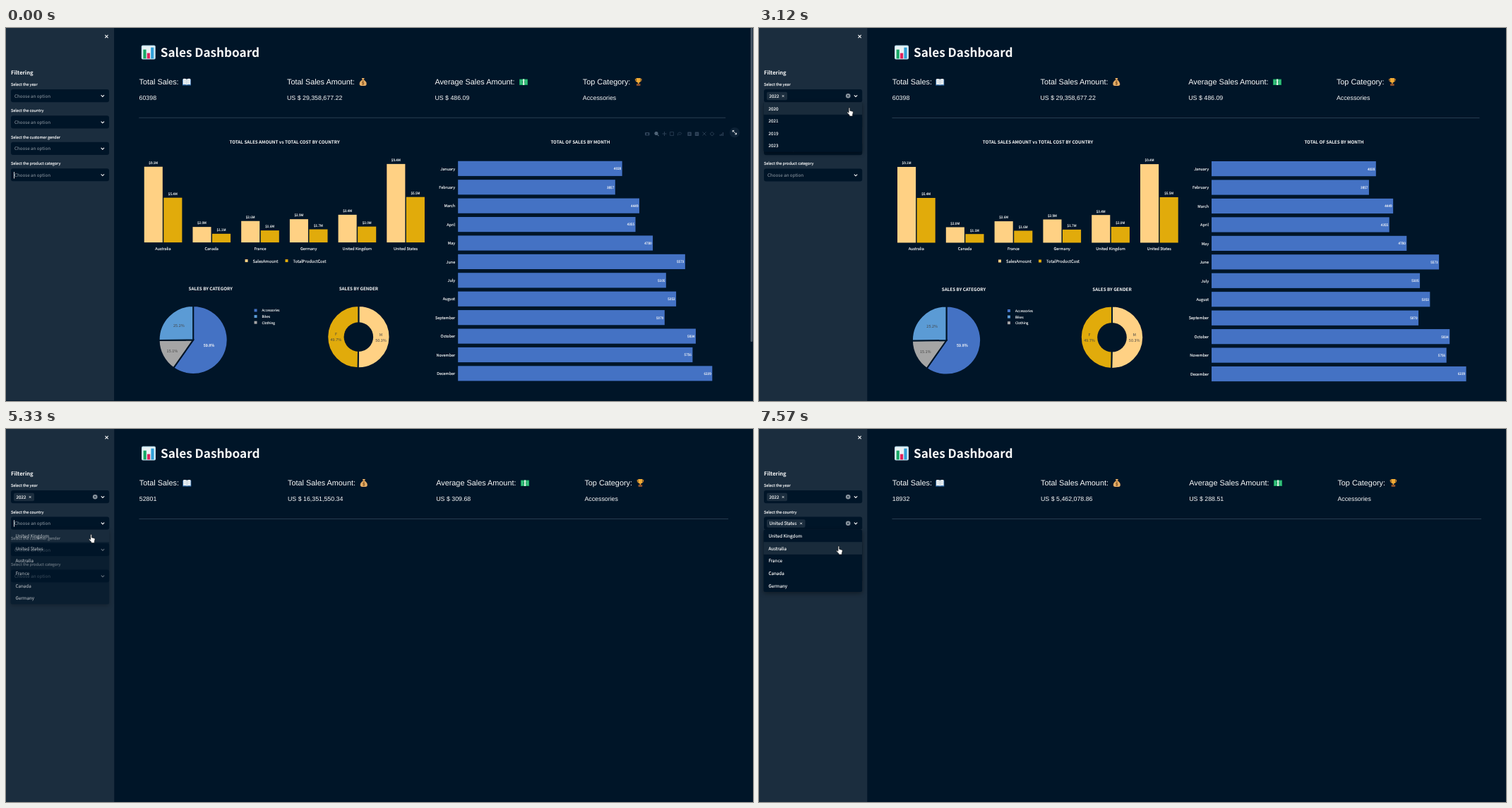
Recreate the animation shown at these times as an HTML page. Size 1058x529 px, loop 8 s.

```html
<!DOCTYPE html>
<html lang="en">
<head>
<meta charset="utf-8">
<title>Sales Dashboard</title>
<style>
  html, body { margin: 0; width: 100%; height: 100%; overflow: hidden; background: #001528; }
  svg { display: block; width: 1058px; height: 529px; }
  text { font-family: "Noto Sans CJK JP", "Noto Sans CJK SC", "Noto Sans CJK KR", "Noto Sans", sans-serif; text-rendering: geometricPrecision; white-space: pre; }
  .plain { font-family: "Liberation Sans", Arial, sans-serif; }
</style>
</head>
<body>
<svg id="stage" viewBox="0 0 1058 529"></svg>
<script>
const LOOP = 8000;
const BG = '#001528', SIDE = '#1b2d3e', HOVER = '#192b3b', WHITE = '#fafafa', MUTED = '#98a2ac';
const BLUE = '#4472c4', SKY = '#5b9bd5', GREY = '#a5a5a5', CREAM = '#ffd184', GOLD = '#e1ab0b', INK = '#444';
const ROW = 17.65;

const DATA = [
  {
    count: '60398', amount: '29,358,677.22', mean: '486.09',
    heights: [107.5, 63.5, 22, 12.3, 30.4, 17, 33, 18.6, 39.3, 22.5, 111.4, 64.5],
    tags: '9.1M 5.4M 2.0M 1.1M 2.6M 1.6M 2.9M 1.7M 3.4M 2.0M 9.4M 5.5M',
    months: [4028, 3857, 4449, 4355, 4780, 5573, 5105, 5352, 5070, 5834, 5756, 6239],
    category: [59.8, 15.1, 25.2], gender: [50.3, 49.7]
  },
  {
    count: '52801', amount: '16,351,550.34', mean: '309.68',
    heights: [88.2, 52, 20.7, 11.1, 30.9, 17.3, 35, 19.5, 42.1, 24, 111.3, 64],
    tags: '4.5M 2.6M 1.1M 820k 1.6M 930k 1.8M 1.0M 2.1M 1.2M 5.5M 3.2M',
    months: [1662, 3453, 4087, 3979, 4399, 5023, 4671, 4865, 4618, 5300, 5224, 5520],
    category: [65.2, 16.5, 18.4], gender: [50.5, 49.5]
  },
  { count: '18932', amount: '5,462,078.86', mean: '288.51' }
];
const COUNTRIES = ['Australia', 'Canada', 'France', 'Germany', 'United Kingdom', 'United States'];
const MONTHS = 'January February March April May June July August September October November December'.split(' ');

// start, data set, charts shown, scroll, wide layout
const VIEWS = [
  [0, 0, 3, 0, 0], [3200, 0, 3, 39, 0], [3270, 1, 0, 0, 0], [3350, 1, 0, 0, 1],
  [5410, 1, 1, 0, 0], [5490, 1, 2, 0, 0], [5570, 1, 3, 0, 0],
  [7410, 1, 3, 39, 0], [7500, 2, 0, 0, 0], [7570, 2, 0, 0, 1]
];
// start, end, select index, options
const YEARS = ['2020', '2021', '2019', '2023'];
const LANDS = ['United Kingdom', 'Australia', 'France', 'Canada', 'Germany'];
const MENUS = [
  [1910, 3120, 0, ['2022', ...YEARS]], [3120, 3930, 0, YEARS],
  [5330, 7340, 1, ['United Kingdom', 'United States', ...LANDS.slice(1)]], [7340, LOOP, 1, LANDS]
];
const CARETS = [[0, 500, 3], [1000, 1500, 3], [1910, 2390, 0], [2880, 3120, 0], [5330, 5800, 1], [6300, 6840, 1]];

const clamp = v => Math.max(0, Math.min(1, v));
const mix = (a, b, p) => a + (b - a) * p;
const rect = (x, y, w, h, fill, rx = 0) => `<rect x="${x}" y="${y}" width="${w}" height="${h}" rx="${rx}" fill="${fill}"/>`;
const path = (d, stroke, w = 1, fill = 'none') => `<path d="${d}" fill="${fill}" stroke="${stroke}" stroke-width="${w}"/>`;
const disc = (x, y, r, fill) => `<circle cx="${x}" cy="${y}" r="${r}" fill="${fill}"/>`;
const shift = (x, y, body) => `<g transform="translate(${x} ${y})">${body}</g>`;
const cross = (x, y, r, color, w) => path(`M${x - r} ${y - r}l${2 * r} ${2 * r}m0 ${-2 * r}l${-2 * r} ${2 * r}`, color, w);

function text(x, y, str, size, { anchor = 'start', bold = false, fill = WHITE, edge = .13 } = {}) {
  return `<text x="${x}" y="${y}" font-size="${(size * .894).toFixed(3)}" font-weight="${bold ? 700 : 400}" ` +
    `text-anchor="${anchor}" fill="${fill}" stroke="${fill}" stroke-width="${edge}">${str}</text>`;
}
const plain = (x, y, str, size) => `<text class="plain" x="${x}" y="${y}" font-size="${size}" fill="${WHITE}">${str}</text>`;
const heading = (x, y, str) => text(x, y, str, 7, { anchor: 'middle', bold: true, edge: 0 });

const ICONS = {
  chart: rect(0, 0, 20, 20, '#b9dcea', 2) + rect(1.2, 1.2, 17.6, 17.6, '#e9f3f6', 1) +
    rect(2.6, 6, 4.2, 12.8, '#16a765') + rect(8, 11, 4.2, 7.8, '#e0245e') + rect(13.4, 3, 4.2, 15.8, '#2f9fd8'),
  book: path('M0 2h12v8.5H0z', 'none', 0, '#3f79b5') + path('M.8 1.2Q4 .4 6 1.8Q8 .4 11.2 1.2V9.2Q8 8.4 6 9.6Q4 8.4 .8 9.2z', 'none', 0, '#eef3f6') +
    path('M6 1.8v7.8', '#9cb2c2', .6) + path('M2 3.4h3M2 5.2h3M2 7h3M7 3.4h3M7 5.2h3M7 7h3', '#b8c6d0', .5),
  bag: path('M3.2 0h3.8L6.2 2.6Q10 5 10 8.3Q10 11 7.5 11H2.6Q0 11 0 8.3Q0 5 3.9 2.6z', 'none', 0, '#e5ad66') +
    path('M3.4 2.8h3.4', '#8a5525', .8) + path('M6.6 5.8Q5 4.6 3.8 5.6Q3.4 6.8 5 7Q6.8 7.4 6.2 8.6Q5 9.6 3.4 8.5M5 4.4v5.6', '#6f4317', .7),
  cash: rect(0, 1.5, 12, 8.5, '#17a05e', .6) + rect(1, 2.5, 10, 6.5, '#36bd7b') + disc(6, 5.8, 2.2, '#0c8450') + rect(5, 1.5, 2.2, 8.5, '#d8f2df'),
  cup: path('M2 1.5H.6Q.4 5 3.2 5.4M8 1.5h1.4Q9.600 5 6.800 5.4', '#e3912a', 1) + path('M2 0h6v3.500Q7.800 6 5.700 6.600V8.200H4.300V6.600Q2.200 6 2 3.500z', 'none', 0, '#f3ab35') +
    rect(2.2, 8, 5.6, 3, '#8a4f2c', .4)
};

function metrics(set, wide) {
  const step = wide ? 210.2 : 209.7;
  const cells = [
    ['Total Sales:', set.count, 'book', 61.5], ['Total Sales Amount:', 'US $ ' + set.amount, 'bag', 102.8],
    ['Average Sales Amount:', 'US $ ' + set.mean, 'cash', 119.8], ['Top Category:', 'Accessories', 'cup', 74]
  ];
  return cells.map(([label, value, icon, dx], i) => {
    const x = 188.8 + i * step;
    return plain(x, 80, label, 10.87) + plain(x, 101.8, value, 8.82) + shift(x + dx, 71, ICONS[icon]);
  }).join('') + rect(188.5, 127, wide ? 834.5 : 832, .8, '#33465a');
}

function barChart(set) {
  const tags = set.tags.split(' ');
  let out = heading(395, 164.2, 'TOTAL SALES AMOUNT vs TOTAL COST BY COUNTRY');
  set.heights.forEach((h, i) => {
    const x = 196 + (i >> 1) * 68.8 + (i % 2) * 27.6;
    out += rect(x, 304.5 - h, 26.1, h, i % 2 ? GOLD : CREAM) + text(x + 13, 300.8 - h, '$' + tags[i], 5.24, { anchor: 'middle' });
  });
  COUNTRIES.forEach((name, i) => out += text(222.8 + i * 68.8, 315.4, name, 6.12, { anchor: 'middle' }));
  return out + rect(339, 328.5, 4, 4, CREAM) + text(350, 333, 'SalesAmount', 6.5) +
    rect(396, 328.5, 4, 4, GOLD) + text(407, 333, 'TotalProductCost', 6.5);
}

function monthChart(set) {
  const top = Math.max(...set.months);
  return heading(814.5, 164.2, 'TOTAL OF SALES BY MONTH') + set.months.map((v, i) => {
    const y = 199.6 + i * 26.45, w = 360.6 * v / top;
    return rect(641, y - 10.6, w, 21.2, BLUE) + text(637, y + 2.2, MONTHS[i], 6.12, { anchor: 'end' }) +
      text(639.5 + w, y + 1.9, v, 5.24, { anchor: 'end' });
  }).join('');
}

function slices(cx, cy, r, parts, colors) {
  const sum = parts.reduce((a, b) => a + b);
  const at = p => `${cx + r * Math.sin(p * 2 * Math.PI)} ${cy - r * Math.cos(p * 2 * Math.PI)}`;
  let start = 0;
  return parts.map((part, i) => {
    const f = part / sum, end = start + f;
    const d = `M${cx} ${cy}L${at(start)}A${r} ${r} 0 ${f > .5 ? 1 : 0} 1 ${at(end)}z`;
    start = end;
    return path(d, BG, 2, colors[i]);
  }).join('');
}

function pies(set) {
  const mid = { anchor: 'middle', fill: INK, edge: 0 };
  let out = heading(290, 372.6, 'SALES BY CATEGORY') + heading(500, 372.6, 'SALES BY GENDER');
  out += slices(265.5, 443, 48.6, set.category, [BLUE, GREY, SKY]);
  let sum = 0;
  set.category.forEach((v, i) => {
    const a = (sum + v / 2) * Math.PI / 50, r = 48 * (v > 50 ? .49 : .85 - v / 100);
    sum += v;
    out += text(265.5 + r * Math.sin(a), 445.2 - r * Math.cos(a), v.toFixed(1) + '%', 6.12, i ? mid : { anchor: 'middle' });
  });
  [['Accessories', BLUE], ['Bikes', SKY], ['Clothing', GREY]].forEach(([name, color], i) => {
    const y = 401 + i * 8.6;
    out += rect(352, y - 2, 4, 4, color) + text(363, y + 2, name, 5.24);
  });
  out += slices(500, 438.7, 44.2, set.gender, [CREAM, GOLD]) + disc(500, 438.7, 20.8, BG);
  const [m, f] = set.gender;
  return out + text(531.7, 437.4, 'M', 6.12, mid) + text(531.7, 445.2, m.toFixed(1) + '%', 6.12, mid) +
    text(468, 436.6, 'F', 6.12, mid) + text(468, 444.6, f.toFixed(1) + '%', 6.12, mid);
}

function toolbar() {
  const c = '#30445a';
  return rect(905, 148, 6.5, 4.6, c, 1) + disc(908.2, 150.4, 1.3, BG) +
    `<circle cx="921" cy="149.500" r="2.2" fill="#506478" stroke="#506478"/>` + path('M922.6 151.2l2 2', '#506478', 1.2) +
    path('M932.500 147v6m-3-3h6', c, .9) + path('M940.500 147.500h5v5h-5z', c, .7) + path('M951.500 152.500q-1-4 3-4.500q4 1 1 3l-3 0', c, .7) +
    rect(965.3, 147.500, 5.500, 5.500, c, .5) + rect(975.8, 147.500, 5.500, 5.500, c, .5) + path('M966.500 150.200h3m-1.500-1.500v3m9 -1.500h3', BG, .7) +
    path('M986.500 147.500l5 5m0-5l-5 5', c, .8) + path('M997 150.200l3-2.700 3 2.700-3 2.600z', c, .8) +
    path('M1011.500 153v-2m2 2v-3m2 3v-5', c, 1.2) + disc(1032, 148.2, 7.2, '#0d2236') +
    path('M1029.200 147.600v-2.200h2.200m-2.200 0l5.400 5.400m0-2.200v2.200h-2.200', WHITE, .9);
}

function sidebar(t) {
  let out = rect(0, 0, 153.3, 529, SIDE) + cross(142.6, 12, 2.1, WHITE, 1.1) + text(7, 65.6, 'Filtering', 8.5, { bold: true, edge: 0 });
  const picks = [t >= 3120 && ['2022', 29], t >= 7340 && ['United States', 54.5]];
  ['year', 'country', 'customer gender', 'product category'].forEach((name, i) => {
    const y = 96.3 + i * 37.43, pick = picks[i];
    out += text(7, y - 14.2, 'Select the ' + name, 6.15) + rect(7, y - 9.2, 139.2, 18.2, BG, 3);
    out += path(`M134.800 ${y - 1}l2.200 2.200 2.200-2.200`, WHITE, 1.1);
    if (pick) {
      out += rect(11, y - 5.6, pick[1], 11.6, SIDE, 2) + text(14.5, y + 2.6, pick[0], 7);
      out += cross(5.5 + pick[1] - .4, y + .2, 1.3, WHITE, .8) + disc(126.2, y, 3.3, '#8d97a1') + cross(126.2, y, 1.2, BG, .8);
    } else out += text(12, y + 2.5, 'Choose an option', 7, { fill: MUTED, edge: 0 });
  });
  return out;
}

function menu(t, handY) {
  const open = MENUS.find(m => t >= m[0] && t < m[1]);
  if (!open) return '';
  const [from, , index, items] = open;
  const top = 105.2 + index * 37.43, active = Math.floor((handY - top + 3) / ROW);
  const fresh = from === 1910 || from === 5330;
  let out = `<g opacity="${fresh && t < from + 80 ? .6 : 1}"><g style="filter:drop-shadow(0 2px 3px #0006)">` +
    rect(6.5, top, 139.6, items.length * ROW, BG, 2) + '</g>';
  items.forEach((name, i) => {
    const y = top + i * ROW;
    if (i === active) out += rect(6.5, y, 139.6, ROW, HOVER);
    out += text(13.5, y + 11.3, name, 7);
  });
  return out + '</g>';
}

function handAt(t) {
  if (t >= 1910 && t < 4670) {
    if (t >= 4590) return [128, 117];
    const p = clamp((t - 2640) / 90);
    return [mix(125, 124.3, p), mix(109, 112.3, p)];
  }
  if (t >= 5330) {
    const p = clamp((t - 6300) / 390);
    return [mix(117, 109.2, p), mix(149, 165.4, p)];
  }
  return null;
}
const HAND = path('M2.800 1.100Q3.700 .1 4.500 1.100V5L8.200 6Q9.100 6.400 9 7.600L8.200 10.800V12.600H3.800V11.300L.7 8Q.1 6.900 1.400 6.800L2.800 7.900z', '#111', .6, '#fff');
const ARROW = path('M.3.3V10.200L2.600 8.100 4.200 11.600 5.700 10.900 4.200 7.600H7.400z', '#111', .6, '#fff');

function arrow(t) {
  if (t >= 190 && t < 940) {
    const p = clamp((t - 190) / 670);
    return shift(mix(1022, 608, p), mix(150, 112, p), ARROW);
  }
  return t >= 1260 && t < 1350 ? shift(144, 109, ARROW) : '';
}

function scene(t) {
  const [, index, shown, scroll, wide] = VIEWS.filter(v => t >= v[0]).pop();
  const set = DATA[index], settle = clamp((t - 120) / 740), fade = 1 - clamp((t - 120) / 300);
  const hand = handAt(t), caret = CARETS.find(c => t >= c[0] && t < c[1]);
  const charts = [barChart, monthChart, pies].slice(0, shown).map(draw => draw(set)).join('');
  const title = scroll ? '' : shift(192, 24.6, ICONS.chart) + text(219, 41.4, 'Sales Dashboard', 19.2, { bold: true, edge: 0 });
  let out = rect(0, 0, 1058, 529, BG) + `<g transform="scale(${mix(.9987, 1, settle)})">` +
    title + shift(0, -scroll, metrics(set, wide) + charts) + sidebar(t) + menu(t, hand ? hand[1] : 0) + '</g>';
  if (fade) out += `<g opacity="${fade}">${toolbar()}${rect(1054.6, 0, 2.800, 445, '#4a5867', 1)}</g>`;
  if (caret) out += rect(11, 91.8 + caret[2] * 37.43, .9, 9.4, WHITE);
  return out + arrow(t) + (hand ? shift(...hand, HAND) : '');
}

const stage = document.getElementById('stage');
const began = performance.now();
let last = '';
function tick() {
  const next = scene((performance.now() - began) % LOOP);
  if (next !== last) stage.innerHTML = last = next;
  requestAnimationFrame(tick);
}
tick();
</script>
</body>
</html>
```
